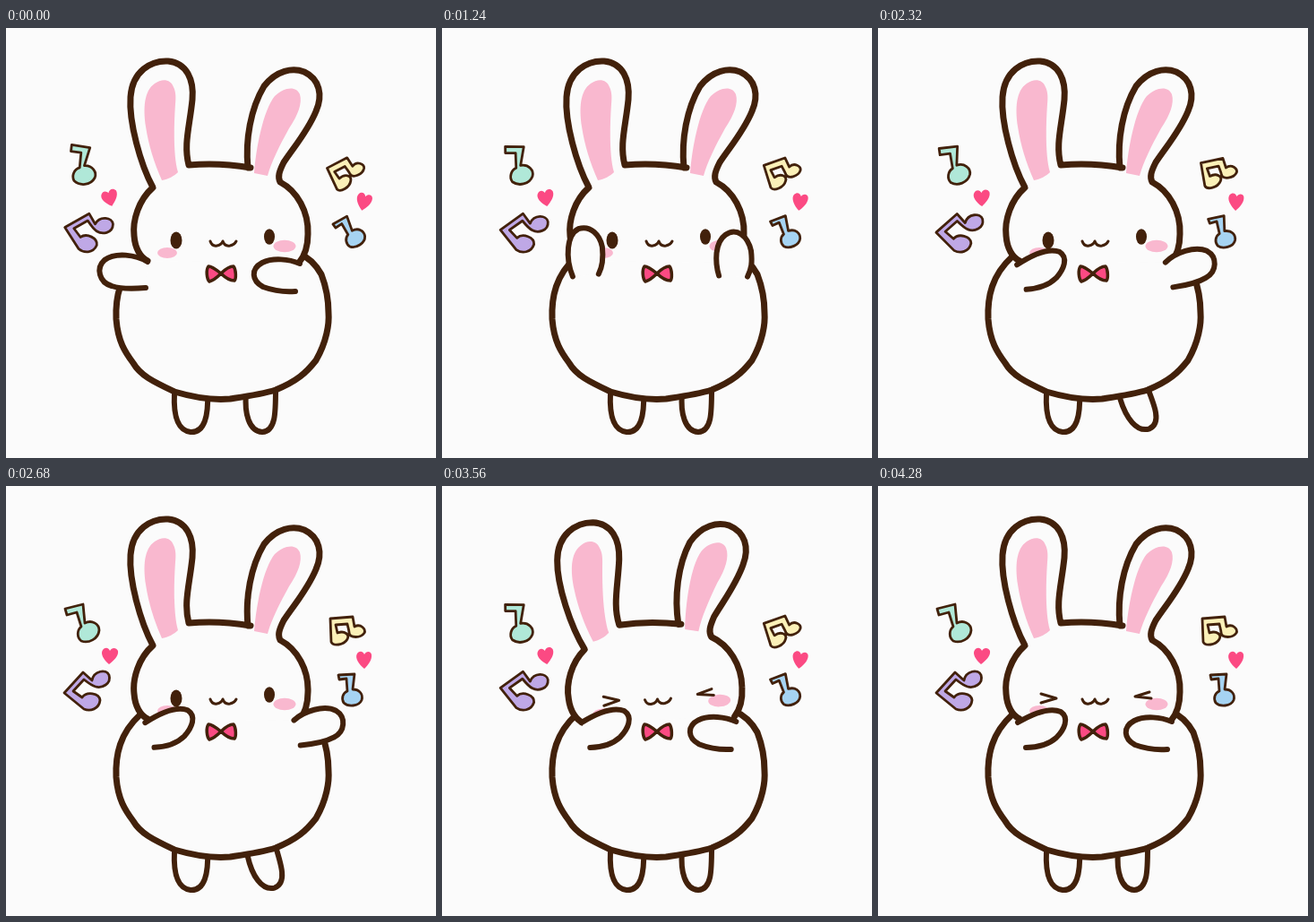
Write an HTML page that moves like this. It is 480x480 px and loops after 4320 ms.

```html
<!DOCTYPE html>
<html lang="en">
<head>
<meta charset="utf-8">
<title>Dancing bunny</title>
<style>
  html, body { margin: 0; width: 100%; height: 100%; overflow: hidden; background: #fbfbfb; }
  svg { display: block; width: 100vw; height: 100vh; }
  .line { fill: #fbfbfb; stroke: #42210b; stroke-width: 7; stroke-linecap: round; stroke-linejoin: round; }
  .limb { stroke-width: 6; }
  .note { stroke: #42210b; stroke-width: 2.8; stroke-linejoin: round; }
  .thin { fill: none; stroke: #42210b; stroke-width: 3; stroke-linecap: round; stroke-linejoin: round; }
  .eye { fill: #42210b; }
  .pink { fill: #f9b8cf; }
  .red { fill: #fb4a83; }
</style>
</head>
<body>
<svg viewBox="0 0 480 480">
  <g id="green" class="note" fill="#b0e8d8"><path d="M66 137L86 132L88 153C96 149 104 154 104 161C103 171 92 176 84 173C79 169 79 161 84 157L79 141L68 144Z"/></g>
  <g id="blue" class="note" fill="#a6d3f2"><path d="M371 211L389 210L387 227C395 227 399 233 397 239C394 246 382 247 377 242C374 237 376 231 381 229L380 215L372 216Z"/></g>
  <g id="yellow" class="note" fill="#fbf0b8"><path d="M362 148L387 146L389 157C396 153 402 160 400 164C396 170 384 170 383 164C383 161 382 159 381 154L368 155L370 164C378 161 384 166 381 171C377 178 365 179 363 174Z"/></g>
  <g id="purple" class="note" fill="#bfa8e6"><path d="M65 231L86 208L96 217C98 206 112 204 115 211C118 221 107 226 100 224C96 223 92 220 87 216L75 229L85 236C90 229 104 231 105 239C104 249 94 252 87 249Z"/></g>
  <g id="heartL" class="red"><path d="M115 199C109 194 105 187 108 183C111 179 115 181 116 184C118 180 123 180 125 184C126 190 120 195 115 199Z"/></g>
  <g id="heartR" class="red"><path d="M400 204C394 199 389 192 392 187C395 183 399 185 400 188C402 184 407 184 408 188C409 194 404 200 400 204Z"/></g>

  <g id="footL"><path class="line limb" d="M188 408C187 428 190 449 206 451C222 452 226 432 225 408"/></g>
  <g id="footR"><path class="line limb" d="M268 408C266 430 271 450 286 451C301 450 301 430 301 403"/></g>
  <path class="line" d="M150 255C127 276 122 300 123 325C125 350 133 362 142 374C150 388 165 395 188 406C205 411 228 416 250 414C270 411 285 409 301 404C325 394 335 385 346 371C358 350 361 330 360 318C360 300 357 288 352 275C346 264 338 256 326 251"/>

  <g id="head">
    <path class="line" d="M158 260C150 256 144 246 143 232C141 215 148 192 164 178C150 152 137 105 139 77C141 48 162 36 181 37C202 39 210 58 208 80C205 110 198 130 204 153C225 151 250 152 273 156L270 156C267 125 273 90 288 65C302 47 320 44 333 49C350 57 354 75 346 93C337 115 322 132 310 150C305 160 303 166 306 172C325 182 338 205 337 230C337 245 333 255 327 262"/>
    <path class="pink" d="M187 66C184 57 174 56 166 62C154 70 153 90 156 110C159 130 165 150 174 170C181 169 188 165 192 161C186 140 188 100 189 85C190 75 189 70 187 66Z"/>
    <path class="pink" d="M328 74C324 64 310 66 300 76C287 92 279 135 277 162L292 165C296 150 305 132 316 112C326 97 331 84 328 74Z"/>
    <ellipse class="pink" cx="180" cy="251" rx="11" ry="6"/>
    <ellipse class="pink" cx="311" cy="243.5" rx="12.5" ry="6.8"/>
    <g id="open" class="eye">
      <ellipse cx="190" cy="237" rx="6.5" ry="9.5"/>
      <ellipse cx="294" cy="233" rx="6" ry="8.7"/>
    </g>
    <path id="shut" class="thin" d="M182 232L199 237L182 242M303 230L287 235L305 237"/>
    <path class="thin" d="M228 238q2 6 7.500 5q5 -1 6.500 -5q2 6 8 5q5 -1 7 -5"/>
  </g>
  <path class="red" stroke="#42210b" stroke-width="3.5" stroke-linejoin="round" d="M240 274C235 270 229 266 226 266C223 270 224 280 227 283C231 282 236 278 240 274C244 270 250 266 254 266C257 270 257 280 255 282C250 282 244 278 240 274Z"/>

  <g id="outL"><path class="line limb" d="M158 261C145 253 122 250 110 259C100 268 104 284 118 288C130 292 145 291 156 290"/></g>
  <g id="outR"><path class="line limb" d="M324 261C337 253 360 250 372 259C382 268 378 284 364 288C352 292 337 291 326 290"/></g>
  <g id="inL"><path class="line limb" d="M156 264C168 257 190 246 204 252C214 259 208 272 199 281C190 289 177 292 165 292"/></g>
  <g id="inR"><path class="line limb" d="M328 263C316 258 298 256 286 262C273 269 274 282 287 289C298 293 311 295 323 294"/></g>
  <g id="upL"><path class="line limb" d="M146 277C138 255 141 230 154 224C168 220 178 232 180 245C181 258 179 268 175 275"/></g>
  <g id="upR"><path class="line limb" d="M309 277C304 262 303 240 315 231C327 222 340 232 344 248C346 262 345 268 341 277"/></g>
</svg>
<script>
const LOOP = 4320, STEP = 40, BEAT = 400;

// [start, left arm, right arm, kicking foot, eyes shut]
const POSES = [
  [0, 'outL', 'inR', 'footL', false],
  [1200, 'upL', 'upR', '', false],
  [1720, 'inL', 'outR', 'footR', false],
  [2800, 'upL', 'upR', '', true],
  [3480, 'inL', 'inR', '', true]
];

// [pivot x, pivot y, degrees at full swing]
const LIMBS = {
  outL: [157, 275, 13], outR: [325, 275, -13],
  inL: [160, 280, -3], inR: [326, 280, 3],
  upL: [160, 280, -9], upR: [325, 280, 9],
  footL: [205, 405, 22], footR: [285, 405, -22]
};

// [pivot x, pivot y, degrees per unit of sway]
const SWAYS = {
  green: [86, 152, 19], blue: [385, 228, -22], yellow: [381, 161, -19],
  purple: [92, 229, 15], heartL: [116, 189, -16], heartR: [400, 193, 12]
};
const REST = -0.2;

const el = id => document.getElementById(id);
const frac = x => x - Math.floor(x);
const swing = x => 1 - Math.abs(2 * frac(x) - 1);
const zigzag = x => 4 * Math.abs(frac(x + 0.75) - 0.5) - 1;
const turn = (id, deg, x, y) => el(id).setAttribute('transform', `rotate(${deg} ${x} ${y})`);
const show = (id, on) => { el(id).style.display = on ? '' : 'none'; };

function draw(t) {
  const [start, left, right, foot, shut] = POSES.filter(p => p[0] <= t).pop();
  const beat = (t - start) / BEAT;

  for (const [id, [x, y, deg]] of Object.entries(LIMBS)) {
    const active = id === left || id === right || id === foot;
    turn(id, active ? deg * swing(beat) : 0, x, y);
    if (!id.startsWith('foot')) show(id, active);
  }
  const sway = zigzag(t / BEAT + 0.25);
  for (const [id, [x, y, deg]] of Object.entries(SWAYS)) turn(id, deg * (sway - REST), x, y);

  const nodding = left === 'inL' && right === 'inR';
  turn('head', nodding ? -4 * zigzag(beat) : 0, 240, 265);
  show('open', !shut);
  show('shut', shut);
}

const origin = performance.now();
function tick() {
  const t = (performance.now() - origin) % LOOP;
  draw(Math.floor(t / STEP) * STEP);
  requestAnimationFrame(tick);
}
tick();
</script>
</body>
</html>
```
